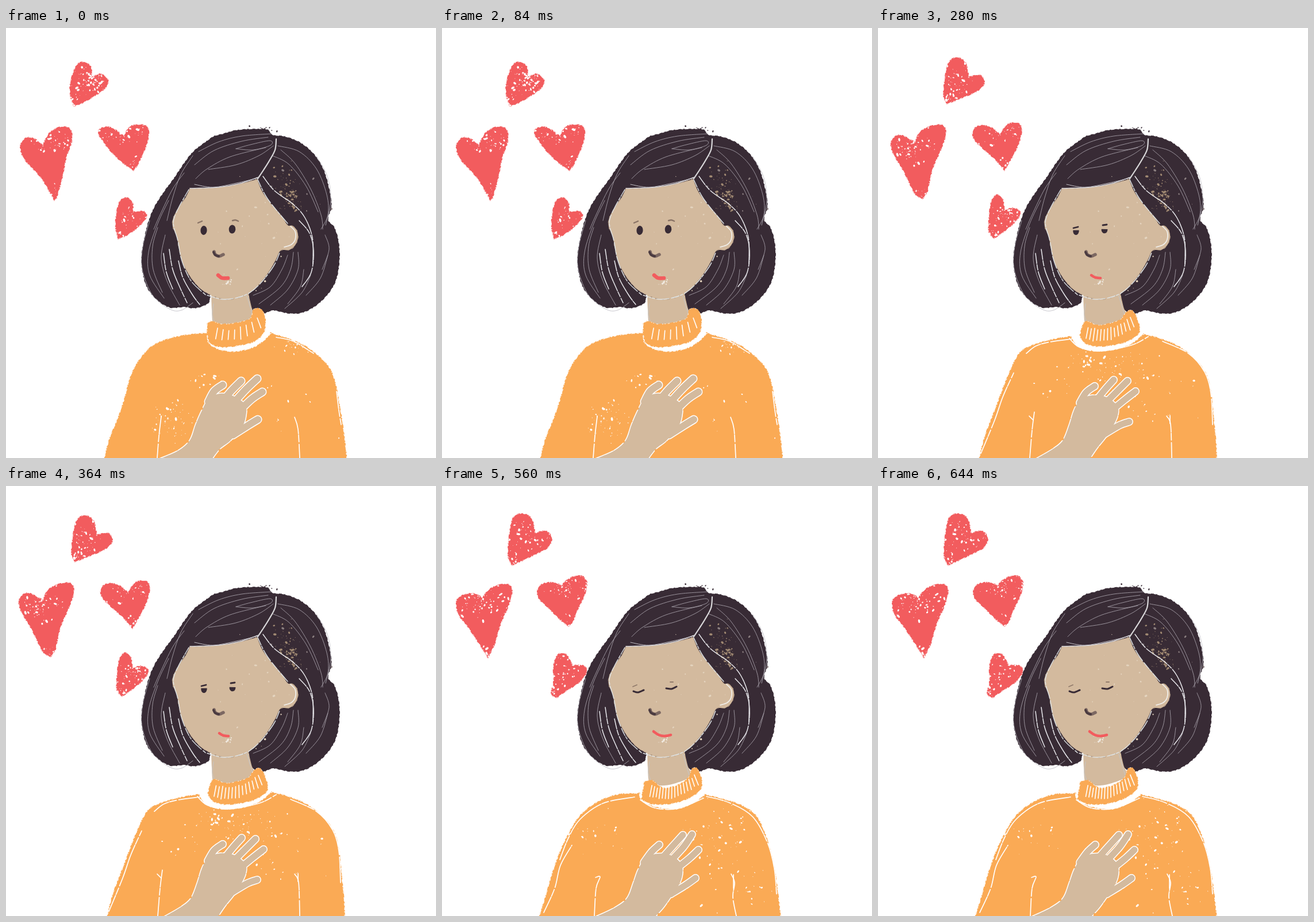
Animation, 748 px wide and 748 px high, one loop 0.7 s. Source, as an HTML page with a canvas:

```html
<!DOCTYPE html>
<html lang="en">
<head>
<meta charset="utf-8">
<title>Warm heart</title>
<style>
html, body { margin: 0; width: 100%; height: 100%; overflow: hidden; background: #fff; }
canvas { display: block; width: 100vw; height: 100vh; }
</style>
</head>
<body>
<canvas id="stage" width="748" height="748"></canvas>
<script>
const ctx = document.getElementById('stage').getContext('2d');
const HAIR = '#382b35', SKIN = '#d3ba9e', WOOL = '#faaa55', LOVE = '#f25c5e', WHITE = '#fff';
const HOLD = 140;

let seed = 1;
const random = () => {
  seed = (seed * 16807) % 2147483647;
  return seed / 2147483647;
};

const points = text => text.trim().split(/\s+/).map(p => p.split(',').map(Number));

// Smooth curve through the points; a repeated point makes a corner.
function curve(text, closed) {
  const p = points(text), path = new Path2D();
  path.moveTo(...p[0]);
  for (let i = 0; i < p.length - 1; i++) {
    const a = p[i - 1] || p[i], b = p[i], c = p[i + 1], d = p[i + 2] || c;
    path.bezierCurveTo(
      b[0] + (c[0] - a[0]) / 6, b[1] + (c[1] - a[1]) / 6,
      c[0] - (d[0] - b[0]) / 6, c[1] - (d[1] - b[1]) / 6, c[0], c[1]);
  }
  if (closed) path.closePath();
  return path;
}

function fill(text, color) {
  const path = curve(text, true);
  ctx.fillStyle = color;
  ctx.fill(path);
  return path;
}

function line(path, width, color, dash = []) {
  ctx.strokeStyle = color;
  ctx.lineWidth = width;
  ctx.setLineDash(dash);
  ctx.stroke(typeof path === 'string' ? curve(path) : path);
  ctx.setLineDash([]);
}

const lines = (list, width, color, dash) => list.forEach(s => line(s, width, color, dash));

// Soft-edged cluster of small crumbs.
function grain(x, y, rx, ry, count, color = WHITE) {
  ctx.fillStyle = color;
  for (let i = 0; i < count; i++) {
    const px = x + rx * (random() + random() + random() - 1.5) * 1.3;
    const py = y + ry * (random() + random() + random() - 1.5) * 1.3;
    const size = 0.5 + 1.9 * random() ** 3;
    ctx.beginPath();
    ctx.ellipse(px, py, size * (0.6 + random()), size * 0.8, random() * 3, 0, 7);
    ctx.fill();
  }
}

function rough(path, color) {
  line(path, 1.6, color, [3, 4, 1, 6, 2, 2, 5, 9]);
  line(path, 1, WHITE, [1, 5, 2, 8, 1, 3]);
}

function heart(outline, x, y, rx, ry, count) {
  const path = fill(outline, LOVE);
  rough(path, LOVE);
  ctx.save();
  ctx.clip(path);
  grain(x, y, rx, ry, count);
  const [tipX, tipY] = points(outline)[0];
  grain(tipX, tipY - 6, 12, 14, 22);
  ctx.restore();
}

function drawHead() {
  const hair = fill(`379,184 400,178 430,176 455,177 463,186 485,189 511,199 535,219 552,246 562,280
    566,310 560,333 571,347 578,370 580,400 575,435 562,460 540,482 515,495 490,496 465,491 445,497
    428,489 422,460 422,460 355,460 355,460 352,478 330,487 310,485 285,486 262,472 245,450 237,420
    236,395 240,370 247,340 258,312 275,285 292,262 308,238 325,216 345,200 362,188`, HAIR);
  line(hair, 1.4, HAIR, [4, 5, 1, 7]);
  grain(448, 178, 18, 5, 18, HAIR);
  grain(495, 296, 14, 17, 80, '#a08972');
  grain(485, 260, 14, 18, 28, '#a08972');
  grain(510, 290, 45, 60, 14, '#8b7f80');

  lines([
    '335,215 370,198 410,188 462,184', '328,238 362,213 410,197 456,190',
    '400,210 430,212 460,204 459,196 425,203 400,210', '330,262 350,245 390,224 452,208',
    '352,246 400,238 440,222 465,205', '325,222 304,255 290,295 280,335',
    '310,252 290,280 268,325 257,350', '283,300 264,340 248,390 250,430 275,470',
    '264,347 255,380 256,420 272,460', '277,360 270,400 280,440 302,482',
    '473,205 510,215 540,245 558,290 560,325 548,350',
    '478,212 503,236 530,280 548,325 551,350', '463,222 492,237 522,275 543,320',
    '490,395 480,420 460,450 430,465', '500,390 495,420 478,450 440,480',
    '508,390 508,420 490,455 460,482', '518,420 512,450 490,480', '530,430 515,460 485,488',
    '560,395 547,435 522,465', '555,360 562,385 550,420'
  ], 0.9, '#a49da6');
  lines(['250,335 238,380 237,420 255,465 285,489 305,491 325,478',
    '540,223 559,258 565,300 556,343'], 0.8, '#b9b8bf');
  lines(['284,385 290,420 302,450 315,478', '274,392 279,425 290,454', '300,405 308,435 325,465 337,481',
    '510,335 528,357 535,388 531,425 515,450', '447,258 467,283 500,307 520,330 533,365 534,410'],
    1.5, '#e8e8ec', [18, 2, 9, 3, 25, 1]);

  fill(`357,455 358,490 361,515 377,521 403,518 432,505 427,485 420,455`, SKIN);
  lines(['361,480 359,498 363,513', '419,466 424,483 430,503'], 1.3, '#c9c3bd');
  const face = fill(`320,279 340,279 370,277 403,272 437,263 437,263 446,285 462,307 480,328 490,343
    498,344 506,352 508,365 503,378 493,386 478,387 470,402 458,423 443,443 425,460 402,470 380,472
    360,466 340,455 322,435 308,410 301,385 297,362 290,346 291,330 302,310 313,294`, SKIN);
  line(face, 1.2, '#a8927f', [4, 6, 2, 9]);
  lines(['318,281 301,311 292,332 292,346 299,370 306,405 322,440 347,464',
    '350,465 380,472 415,465 440,447 465,415 476,391', '438,264 455,297 490,340'],
    1.4, '#dfe4e6', [14, 2, 5, 3, 22, 4]);
  line('320,279 370,277 405,271 438,260', 1.6, '#d9d8da');
  line('328,272 360,277 400,270 438,261', 1, '#c3bfc5');
  line('470,193 468,212 458,231 448,247 438,262', 2.2, '#d9d8da');
  line('495,345 503,354 503,368 496,377 484,381', 1.8, '#f0eee9');
  grain(384, 444, 10, 7, 15, '#f1eae0');
  grain(425, 355, 55, 65, 24, '#e4d4bf');

  line('362,389 364,394 371,397 378,394', 5.5, '#7c6862');
  line('361,390 364,395 370,397', 4, '#4b3b40');
}

function drawCollar(outline, ribs) {
  const path = fill(outline, WOOL);
  rough(path, WOOL);
  const bend = (a, b, c, t) => a * (1 - t) ** 2 + 2 * b * t * (1 - t) + c * t * t;
  for (let i = 0; i < ribs; i++) {
    const t = (i + 0.6) / ribs, cut = 0.08 + 0.12 * random();
    const x0 = bend(363, 402, 440, t), y0 = bend(516, 530, 499, t);
    const x1 = bend(357, 400, 450, t), y1 = bend(545, 563, 522, t);
    const at = k => `${x0 + (x1 - x0) * k},${y0 + (y1 - y0) * k}`;
    line(`${at(cut)} ${at(0.92 - cut)}`, 1.6, WHITE);
  }
}

function drawHand(palm, fingers, width) {
  const parts = fingers.trim().split('|').map(f => curve(f));
  const palmPath = curve(palm, true);
  line(palmPath, 3, WHITE, [34, 3, 20, 6]);
  for (const finger of parts) {
    line(finger, width + 3, WHITE, [26, 2, 40, 0]);
    line(finger, width, SKIN);
  }
  ctx.fillStyle = SKIN;
  ctx.fill(palmPath);
}

function drawEye(x, y, rx, ry, lidded) {
  ctx.fillStyle = HAIR;
  ctx.beginPath();
  ctx.ellipse(x, y, rx, ry, 0.05, lidded ? -0.2 : 0, lidded ? 3.3 : 7);
  ctx.fill();
}

const poses = [
  {
    sweater: `171,750 180,715 195,678 207,642 213,618 222,594 236,572 256,552 285,540 320,533 350,531 350,531
      352,548 372,560 400,563 430,556 450,543 461,531 461,531 490,540 520,553 545,572 563,592 573,618 579,650 586,692 593,750`,
    collar: '350,515 358,510 375,515 400,513 425,505 430,490 443,489 451,505 448,530 430,546 400,553 375,555 355,548 350,530',
    ribs: 8,
    seams: ['270,676 266,710 263,748', '502,677 508,698 511,748', '575,632 579,665 583,690', '470,538 500,545 535,566'],
    specks: [[290, 680, 25, 30, 55], [505, 552, 32, 10, 28], [345, 612, 22, 12, 12], [480, 655, 80, 70, 12]],
    palm: '266,750 300,735 320,717 330,690 341,665 352,646 372,636 395,640 416,655 417,676 410,695 390,718 372,732 358,750',
    fingers: '352,650 362,632 377,621|372,655 392,631 409,614|396,652 418,628 437,610|410,662 428,645 446,633|395,708 420,692 438,681',
    thick: 12,
    face() {
      drawEye(344, 352, 5.6, 8); drawEye(393.5, 350, 5.8, 7.6);
      lines(['334,339 341,336', '394,335 399,334 404,336'], 2.4, '#8a7466');
      line('369,430 376,435 386,435', 6.5, LOVE);
    },
    hearts() {
      heart('118,136 112,118 112,95 122,66 135,59 148,68 148,86 148,86 165,80 178,92 170,107 148,122 130,132', 149, 92, 22, 16, 90);
      heart('84,300 62,262 32,228 25,205 35,191 50,193 64,204 64,204 76,182 95,172 111,175 115,195 105,225 98,260 88,296', 88, 195, 30, 22, 65);
      heart('222,248 200,232 180,212 169,197 160,182 168,173 185,174 205,188 205,188 215,172 232,168 246,172 248,190 240,215 228,240', 210, 180, 48, 17, 95);
      heart('195,367 191,350 191,330 197,303 209,295 220,303 221,320 221,320 240,319 244,330 228,348 208,362', 224, 325, 24, 18, 50);
    }
  },
  {
    sweater: `172,750 182,715 200,668 212,625 228,590 246,565 265,548 295,537 325,538 345,541 345,541
      360,558 390,562 430,555 455,540 475,536 510,550 540,570 562,592 575,620 580,655 586,690 590,715 590,750`,
    collar: '351,516 365,513 370,518 400,515 425,506 435,495 445,493 452,510 449,530 425,545 380,553 352,553 348,540',
    ribs: 15,
    seams: ['261,740 266,705 269,680 279,672', '268,690 271,705 266,738', '507,680 510,710 511,748', '509,685 510,748',
      '180,742 200,682 215,635 230,605 247,584', '571,608 581,650 582,690 578,740', '328,545 355,560 395,571',
      '252,562 285,550 320,545', '475,539 515,555 562,600'],
    specks: [[512, 620, 36, 42, 75], [445, 578, 20, 12, 14], [535, 715, 25, 25, 14], [450, 600, 110, 60, 14]],
    palm: '273,750 300,737 322,717 329,690 338,665 346,646 367,640 392,643 414,658 414,676 407,697 395,715 378,735 370,750',
    fingers: '347,652 358,636 375,626|370,655 390,630 408,611|392,652 414,630 433,612|405,664 424,650 441,639|392,708 418,693 435,685',
    thick: 10.5,
    extra: '368,651 376,637 388,627',
    face() {
      drawEye(344, 353, 5.6, 6.5); drawEye(393.5, 351, 5.9, 5.9);
      lines(['336,343 341,340', '391,339 398,338'], 2.2, '#8a7466');
      line('371,430 378,435 387,435', 4.5, LOVE);
    },
    hearts() {
      heart('120,134 114,115 113,92 122,64 136,57 150,66 149,86 149,86 170,80 183,88 180,102 160,116 140,123 128,133', 148, 98, 28, 25, 30);
      heart('82,308 70,295 56,265 38,238 23,212 25,196 42,190 63,207 63,207 72,194 82,180 100,171 116,178 112,205 100,235 90,265 84,285 84,305', 48, 202, 28, 18, 60);
      heart('214,246 205,228 180,210 162,192 163,173 178,168 196,175 206,181 206,181 222,168 240,165 249,172 246,195 234,222 222,240', 184, 184, 27, 18, 80);
      heart('197,368 190,361 192,340 197,312 203,297 214,296 222,308 223,319 223,319 240,319 243,330 232,345 210,355', 222, 328, 22, 24, 34);
    }
  },
  {
    sweater: `176,750 186,710 205,660 222,615 240,575 255,558 290,545 330,537 336,538 336,538
      347,554 375,562 410,560 440,550 462,533 462,533 490,540 525,555 555,580 572,605 580,640 584,680 588,720 589,750`,
    collar: '355,520 362,510 385,517 420,508 432,494 444,493 455,520 450,535 425,548 385,554 360,548 351,535',
    ribs: 14,
    seams: ['272,668 268,700 264,748', '263,675 270,682', '502,675 509,690 511,748', '508,674 508,688', '179,740 203,682 217,642 236,600',
      '258,566 275,553 300,546 337,541', '495,545 540,566 568,598 579,635 582,690', '333,540 350,555 385,562 440,552 470,537'],
    specks: [[410, 595, 65, 26, 80], [470, 650, 70, 50, 24], [300, 640, 45, 50, 10], [355, 578, 20, 9, 14]],
    palm: '274,750 305,732 322,717 333,690 341,665 352,647 372,639 397,642 416,657 417,674 408,694 396,712 380,732 368,750',
    fingers: '351,652 362,634 377,623|374,655 394,630 410,612|396,652 418,630 434,614|408,664 430,646 448,632|395,706 420,691 437,685',
    thick: 11,
    face() {
      drawEye(344.5, 353, 5.2, 7, true); drawEye(394, 351, 5.4, 6.2, true);
      lines(['340,348 348,346', '391,343 398,342'], 2.8, HAIR);
      line('371,430 378,434 387,435', 4.5, LOVE);
    },
    hearts() {
      heart('120,132 114,118 116,90 122,62 136,51 152,60 158,85 158,85 178,82 185,96 172,110 145,122', 130, 95, 24, 26, 60);
      heart('78,297 64,288 45,250 25,215 24,195 38,186 58,195 65,198 65,198 72,182 90,171 112,169 118,185 108,215 95,245 86,285', 58, 208, 40, 24, 85);
      heart('220,248 205,230 185,212 168,195 165,180 175,170 195,172 212,185 212,185 225,168 242,165 250,175 246,198 235,222', 212, 182, 40, 17, 50);
      heart('202,366 193,355 193,330 197,302 207,290 217,298 220,317 220,317 236,313 248,322 238,338 218,355', 230, 327, 22, 17, 55);
    }
  },
  {
    sweater: `168,750 185,705 200,665 215,620 232,585 250,562 272,545 300,540 335,536 345,540 345,540
      355,551 380,556 430,548 460,535 490,535 515,545 540,568 560,595 575,625 580,665 584,710 584,750`,
    collar: '352,518 358,508 370,516 400,513 425,503 432,492 440,491 451,508 450,530 420,542 385,550 355,547 346,540',
    ribs: 10,
    seams: ['265,678 272,684 268,689', '511,683 508,697 513,748', '174,742 200,690 216,640 236,600 258,571',
      '258,571 280,553 325,545', '475,540 520,565 558,610 578,660 583,720', '350,548 380,558 425,550 455,540'],
    specks: [[492, 680, 30, 14, 44], [430, 570, 28, 18, 14], [270, 718, 8, 6, 5], [560, 615, 18, 18, 12]],
    palm: '270,750 302,732 331,708 332,690 339,665 350,647 370,643 397,646 416,660 416,676 408,695 398,708 384,730 370,750',
    fingers: '350,654 364,636 375,619|377,656 398,630 413,611|398,654 420,628 436,610|410,666 432,648 445,632|395,708 424,695 437,680',
    thick: 11,
    face() {
      drawEye(345, 354, 5, 6, true); drawEye(394, 351, 5.2, 5.8, true);
      line('338,353 343,349 349,347', 2, '#6d5a56');
      line('391,344 402,346', 3, HAIR);
      line('371,430 380,434 398,433', 4.6, LOVE);
    },
    hearts() {
      heart('125,138 113,118 113,90 120,60 138,51 155,58 158,80 158,80 178,82 185,93 176,110 155,122 140,135', 142, 95, 40, 34, 150);
      heart('85,305 70,280 45,250 28,222 25,198 40,183 55,184 66,190 66,190 75,175 92,165 112,165 122,180 118,205 103,235 95,265 92,300', 82, 218, 40, 40, 115);
      heart('217,245 205,230 182,210 165,193 164,178 180,169 200,172 208,173 208,173 225,165 240,163 251,172 248,192 232,215 226,235', 206, 190, 45, 22, 130);
      heart('200,369 191,358 193,335 200,300 210,287 224,295 228,308 228,308 243,310 249,322 240,340 220,352', 215, 298, 25, 22, 50);
    }
  },
  {
    sweater: `169,750 180,715 190,680 202,645 215,615 235,580 255,560 280,545 310,536 342,535 342,535
      350,550 378,560 410,562 440,550 458,537 458,537 490,545 520,555 545,572 560,600 570,630 578,665 584,705 589,750`,
    collar: '352,515 365,512 385,525 410,520 428,508 435,492 444,492 452,512 448,530 425,545 395,553 365,553 347,545',
    ribs: 16,
    seams: ['267,681 275,680 268,700 265,748', '503,675 509,690 506,715 512,748', '507,676 507,700', '177,742 196,700 206,660 226,625',
      '205,650 220,612 240,580 280,552 335,541', '460,540 500,551 540,575 566,620 578,665 582,710', '345,546 370,560 410,561 455,543'],
    specks: [[490, 610, 55, 55, 80], [530, 700, 60, 40, 22], [300, 610, 60, 40, 10], [255, 600, 14, 22, 12]],
    palm: '266,750 300,734 322,717 333,690 341,668 352,650 372,640 397,642 416,657 418,676 412,694 400,712 386,732 370,750',
    fingers: '351,655 364,637 378,624|374,657 400,628 419,607|398,652 420,628 435,606|410,664 430,648 446,633|398,710 424,694 441,682',
    thick: 11,
    face() {
      lines(['333,357 341,359 351,355', '390,352 399,353 408,349'], 3, HAIR);
      lines(['332,349 339,346', '397,341 402,341'], 1.9, '#927c6c');
      line('368,427 377,433 387,435 398,433', 4.6, LOVE);
    },
    hearts() {
      heart('122,138 115,122 117,85 124,55 140,48 156,57 162,82 162,82 180,78 191,90 184,107 160,120 135,132', 142, 90, 30, 26, 65);
      heart('80,299 65,275 45,245 28,222 26,198 42,188 60,188 70,195 70,195 80,182 95,173 115,171 122,183 115,210 102,240 92,275', 75, 205, 52, 24, 95);
      heart('220,244 205,232 185,212 168,195 167,178 178,169 195,168 208,173 208,173 222,160 242,156 252,167 248,190 236,215 228,236', 222, 174, 34, 14, 75);
      heart('200,368 190,362 194,340 194,312 202,293 216,293 227,312 227,312 245,312 252,323 238,342 215,357', 212, 322, 24, 32, 55);
    }
  }
];

function draw(index) {
  const pose = poses[index];
  seed = 77;
  ctx.fillStyle = WHITE;
  ctx.fillRect(0, 0, 748, 748);
  ctx.lineCap = ctx.lineJoin = 'round';
  drawHead();
  seed = 4001 + index * 937;
  pose.face();
  pose.hearts();

  const sweater = fill(pose.sweater, WOOL);
  rough(sweater, WOOL);
  ctx.save();
  ctx.clip(sweater);
  pose.specks.forEach(s => grain(...s));
  ctx.restore();
  lines(pose.seams, 1.7, WHITE, [30, 2, 12, 4, 45, 1]);
  drawCollar(pose.collar, pose.ribs);
  drawHand(pose.palm, pose.fingers, pose.thick);
  if (pose.extra) line(pose.extra, 5, WHITE);
}

const start = performance.now();
let shown = -1;
function tick() {
  const index = Math.floor((performance.now() - start) / HOLD) % poses.length;
  if (index !== shown) draw(shown = index);
  requestAnimationFrame(tick);
}
tick();
</script>
</body>
</html>
```
